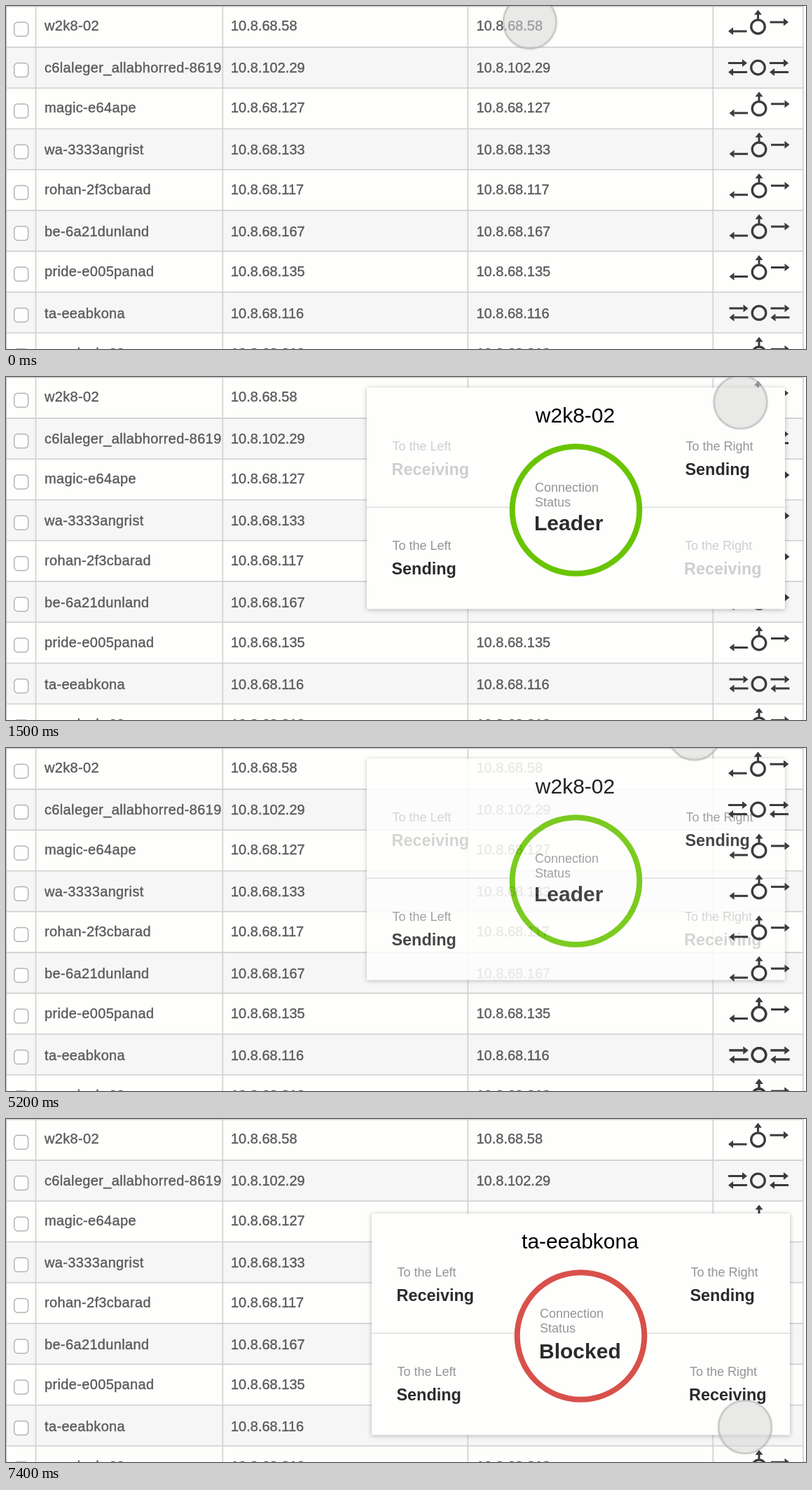
An HTML page for the animation above (8 s loop, 1142 by 490 pixels).

```html
<!DOCTYPE html>
<html lang="en">
<head>
<meta charset="utf-8">
<title>Connection status table</title>
<style>
  html, body { margin: 0; width: 100%; height: 100%; overflow: hidden; background: #fefefd; }
  svg { display: block; width: 100%; height: 100%; font-family: "Liberation Sans", Arial, sans-serif; }
  .cell { font-size: 20px; fill: #5b5b5b; stroke: #5b5b5b; stroke-width: .4; }
  .name { letter-spacing: .35px; }
  .grid { stroke: #cfcfcf; stroke-width: 1.6; }
  .box { fill: #fefefe; stroke: #b4b4b4; stroke-width: 1.5; }
  .icon { stroke: #3b3b3d; stroke-width: 3; fill: none; }
  .icon .head { fill: #3b3b3d; stroke: none; }
  .card { fill: #fefefd; filter: drop-shadow(0 1px 3px rgba(0, 0, 0, .28)); }
  .title { font-size: 30px; text-anchor: middle; }
  .label { font-size: 18px; fill: #959595; }
  .value { font-size: 23.4px; font-weight: bold; fill: #2b2b2b; }
  .off { fill: #cfcfcf; }
  .state { font-size: 30px; font-weight: bold; fill: #2b2b2b; }
  .rule { stroke: #dcdcdc; stroke-width: 1.5; }
  .cursor { fill: rgba(230, 230, 230, .5); stroke: rgba(178, 178, 178, .6); stroke-width: 2.6;
            filter: drop-shadow(0 0 1.5px rgba(0, 0, 0, .15)); }
</style>
</head>
<body>
<svg viewBox="0 0 1142 490" preserveAspectRatio="none">
  <g id="table"></g>
  <g id="icons"></g>
  <g id="cards"></g>
  <use id="iconsTop" href="#icons"/>
  <circle id="cursor" class="cursor" r="37.8"/>
</svg>
<script>
const LOOP = 8000;
const STEP = 58.3;
const $ = id => document.getElementById(id);

const rows = [
  ["w2k8-02", "10.8.68.58"],
  ["c6laleger_allabhorred-8619", "10.8.102.29", true],
  ["magic-e64ape", "10.8.68.127"],
  ["wa-3333angrist", "10.8.68.133"],
  ["rohan-2f3cbarad", "10.8.68.117"],
  ["be-6a21dunland", "10.8.68.167"],
  ["pride-e005panad", "10.8.68.135"],
  ["ta-eeabkona", "10.8.68.116", true],
  ["mandush-69", "10.8.68.213"]
];

const text = (x, y, cls, str) => `<text x="${x}" y="${y}" class="${cls}">${str}</text>`;
const line = (x1, y1, x2, y2, cls) =>
  `<line x1="${x1}" y1="${y1}" x2="${x2}" y2="${y2}" class="${cls}"/>`;

// Arrow from (x, y) along the x axis; a negative length points left.
function arrow(x, y, len) {
  const tip = x + len, neck = tip - Math.sign(len) * 7;
  return `<path d="M${x} ${y}H${neck}"/><path class="head" d="M${tip} ${y}L${neck} ${y - 5.5}V${y + 5.5}Z"/>`;
}

function icon(x, y, twoWay) {
  const pair = left => arrow(left, -6.5, 27) + arrow(left + 27, 6.5, -27);
  const marks = twoWay
    ? pair(-42.5) + pair(16.5)
    : arrow(17, -6.5, 26.5) + arrow(-16, 6.5, -26.5) +
      '<path d="M0 -10V-18"/><path class="head" d="M0 -24L-5.5 -17H5.5Z"/>';
  return `<g class="icon" transform="translate(${x} ${y})"><circle r="9.8" stroke-width="3.3"/>${marks}</g>`;
}

function buildTable() {
  let table = "", icons = "";
  rows.forEach(([name, ip, twoWay], i) => {
    const top = .6 + STEP * i, base = 58.4 * i + (i % 2 ? 37 : 35.3);
    table += `<rect x="0" y="${top}" width="1138" height="${STEP}" fill="${i % 2 ? "#f6f6f7" : "#fefefc"}"/>` +
      line(0, top, 1138, top, "grid") +
      `<rect class="box" x="11.7" y="${top + 22.7}" width="20" height="20" rx="5"/>` +
      text(55, base, "cell name", name) + text(321, base, "cell", ip) + text(671.5, base, "cell", ip);
    icons += icon(i < 2 ? 1073.5 : 1075, 29.6 + 58.4 * i, twoWay);
  });
  for (const x of [.5, 42.5, 309.3, 659.3, 1009.3, 1138]) table += line(x, 0, x, 490, "grid");
  $("table").innerHTML = table;
  $("icons").innerHTML = icons;
}

function field(x, y, side, value, off) {
  const tint = off ? " off" : "";
  return text(x + 1, y, "label" + tint, "To the " + side) + text(x, y + 35, "value" + tint, value);
}

function makeCard({ x, y, title, state, stateY, color, idle }) {
  const g = document.createElementNS("http://www.w3.org/2000/svg", "g");
  g.setAttribute("transform", `translate(${x} ${y})`);
  g.innerHTML = '<rect class="card" width="597" height="316.5"/>' +
    line(0, 171, 602, 171, "rule") +
    `<circle cx="298.5" cy="175" r="90.8" fill="#fefefd" stroke="${color}" stroke-width="8"/>` +
    text(297.5, 50, "title", title) +
    field(35.5, 90, "Left", "Receiving", idle) + field(454.5, 90, "Right", "Sending") +
    field(35.5, 232, "Left", "Sending") + field(453, 232, "Right", "Receiving", idle) +
    text(240, 148.5, "label", "Connection") + text(240, 169.5, "label", "Status") +
    text(239, stateY, "state", state);
  $("cards").append(g);
  const rule = g.querySelector(".rule");
  return (alpha, shift) => {
    g.setAttribute("opacity", alpha);
    g.style.display = alpha > 0 ? "" : "none";
    rule.setAttribute("transform", `translate(0 ${shift})`);
  };
}

// Cursor knots: time, x, y
const path = [
  [0, 747, 23], [200, 903, 30], [380, 1012, 34], [560, 1048.5, 36], [4960, 1048.5, 36],
  [5200, 983, -20.5], [5400, 930, -75], [5900, 868, -110], [5980, 880, -32],
  [6220, 927, 178], [6600, 985, 310], [7000, 1025, 408], [7040, 1030, 415], [7400, 1055, 440], [8000, 1055, 440]
];

const slope = (i, k) => (path[i + 1][k] - path[i][k]) / (path[i + 1][0] - path[i][0]);

function tangent(i, k) {
  if (i === 0) return slope(0, k);
  if (i === path.length - 1) return 0;
  const a = slope(i - 1, k), b = slope(i, k);
  return a * b > 0 ? 2 * a * b / (a + b) : 0;
}

// Monotone cubic through the knots
function along(t, k) {
  let i = 0;
  while (i < path.length - 2 && t >= path[i + 1][0]) i++;
  const h = path[i + 1][0] - path[i][0], s = (t - path[i][0]) / h, r = 1 - s;
  return (1 + 2 * s) * r * r * path[i][k] + s * r * r * h * tangent(i, k) +
    s * s * (3 - 2 * s) * path[i + 1][k] - s * s * r * h * tangent(i + 1, k);
}

const ramp = (t, from, to) => Math.min(1, Math.max(0, (t - from) / (to - from)));

buildTable();
const leader = makeCard({ x: 515, y: 15, title: "w2k8-02", state: "Leader", stateY: 203.5, color: "#69c400", idle: true });
const blocked = makeCard({ x: 522, y: 135, title: "ta-eeabkona", state: "Blocked", stateY: 206.5, color: "#d8514b" });

function draw(t) {
  const shown = ramp(t, 380, 780), gone = ramp(t, 5152, 5520), next = ramp(t, 7018, 7400);
  leader(shown * (1 - gone), 110 * (1 - shown));
  blocked(next, 110 * (1 - next));
  $("iconsTop").style.display = gone > 0 && gone < 1 ? "" : "none";
  $("cursor").setAttribute("cx", along(t, 1));
  $("cursor").setAttribute("cy", along(t, 2));
}

const start = performance.now();
function tick() {
  draw((performance.now() - start) % LOOP);
  requestAnimationFrame(tick);
}
tick();
</script>
</body>
</html>
```
